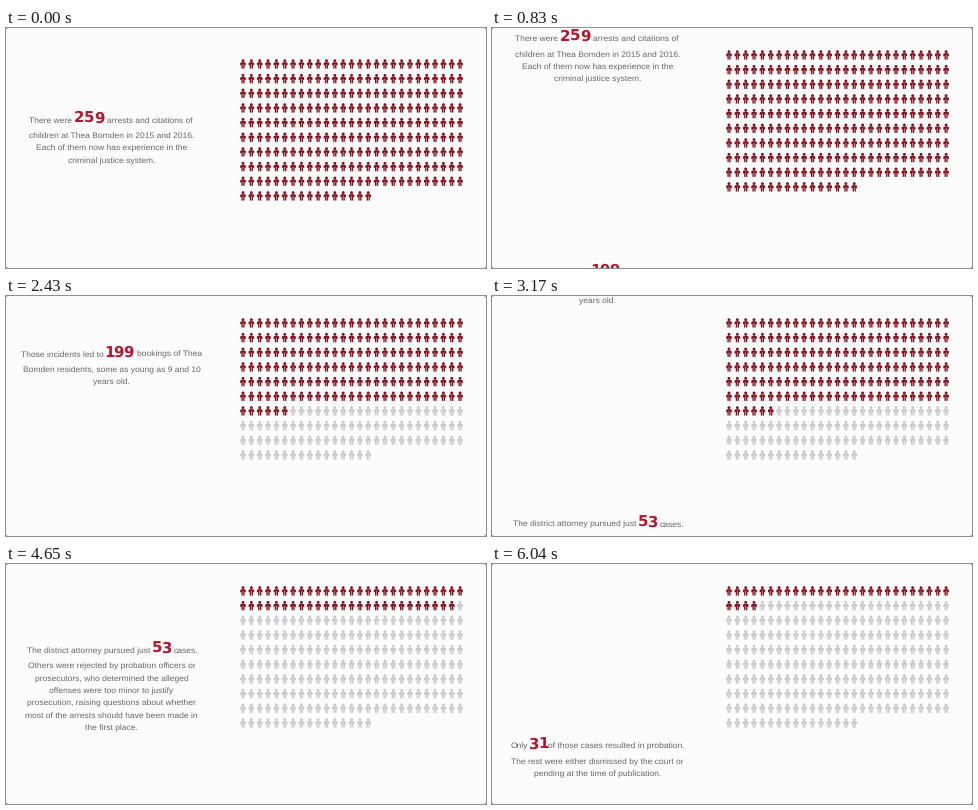
Animation of 480 by 240 pixels, one loop 6080 ms. Source, as a matplotlib script:

```python
import numpy as np
import matplotlib.pyplot as plt
from matplotlib.animation import FuncAnimation
from matplotlib.collections import PathCollection
from matplotlib.patches import FancyBboxPatch
from matplotlib.path import Path
from matplotlib.transforms import Affine2D, IdentityTransform

W, H, DPI = 480, 240, 100
FRAMES, STEP = 152, 40
PAPER, INK, RED = "#fdfcfd", "#666666", "#b5152b"
ICON_RED, ICON_GREY = "#83101f", "#c9c8ca"
COLS, PEOPLE = 27, 259
CENTER, TRIGGER = 105.5, 213

plt.rcParams["text.hinting"] = "no_hinting"

# Scroll distance in pixels at points in time (ms)
TIMES = [0, 610, 830, 1220, 1650, 1850, 2430, 3170, 4090, 4310, 4910, 5300, 5520, 6040]
SCROLL = [0, 61, 85, 133, 177, 191, 272, 350, 434, 462, 514, 550, 564, 667]

# top, red icons, lead, number, (left, right) of number, tail, further lines
BLOCKS = [
    (92, 259, "There were", "259", (68, 99), "arrests and citations of",
     ["children at Thea Bomden in 2015 and 2016.",
      "Each of them now has experience in the",
      "criminal justice system."]),
    (326, 168, "Those incidents led to", "199", (100, 129), "bookings of Thea",
     ["Bomden residents, some as young as 9 and 10",
      "years old."]),
    (577, 53, "The district attorney pursued just", "53", (146, 166), "cases.",
     ["Others were rejected by probation officers or",
      "prosecutors, who determined the alleged",
      "offenses were too minor to justify",
      "prosecution, raising questions about whether",
      "most of the arrests should have been made in",
      "the first place."]),
    (849, 31, "Only", "31", (38, 54), "of those cases resulted in probation.",
     ["The rest were either dismissed by the court or",
      "pending at the time of publication."]),
]

fig = plt.figure(figsize=(W / DPI, H / DPI), dpi=DPI, facecolor="#8a8a8c")
ax = fig.add_axes([0, 0, 1, 1])
ax.set(xlim=(0, W), ylim=(H, 0))
ax.axis("off")
ax.add_patch(FancyBboxPatch((0, 0), W, H, fc=PAPER, ec="none",
                            boxstyle="round,pad=0,rounding_size=2.5"))

labels = []


def label(x, y, text, ha, px=8.45, color=INK, font="Liberation Sans", weight="normal"):
    item = ax.text(x, y, text, ha=ha, va="baseline", fontsize=px * 72 / DPI,
                   color=color, family=font, weight=weight)
    labels.append((item, y))


def number(x, y, digits):
    for d in digits:
        narrow = d == "1"
        label(x - 1.4 * narrow - 0.6, y, d, "left", 15, RED, "DejaVu Sans", "bold")
        x += 7.6 if narrow else 10.4


for top, _, lead, num, (left, right), tail, lines in BLOCKS:
    base = top + 2.5
    label(left - 2, base, lead, "right")
    number(left, base, num)
    label(right + 2, base, tail, "left")
    for k, line in enumerate(lines):
        label(CENTER, base + 15.7 + 12.4 * k, line, "center")


def person():
    head = Path.unit_circle().transformed(Affine2D().scale(1.45).translate(0, 3.3))
    half = [(0.25, 0), (0.25, -4.6), (1.6, -4.6), (1.6, -0.9), (1.9, -0.9),
            (1.9, -1.3), (2.8, -1.3), (2.8, 0.9), (2.0, 1.7)]
    outline = half + [(-x, y) for x, y in reversed(half)]
    return Path.make_compound_path(head, Path(outline + outline[:1], closed=True))


index = np.arange(PEOPLE)
spots = np.column_stack([237 + 8.35 * (index % COLS), 36 + 14.66 * (index // COLS)])
crowd = PathCollection([person()], offsets=spots, offset_transform=ax.transData,
                       transform=IdentityTransform(), linewidths=0)
ax.add_collection(crowd, autolim=False)


def update(frame):
    scroll = np.interp(frame * STEP, TIMES, SCROLL)
    for item, y in labels:
        item.set_y(y - scroll)
        item.set_visible(-10 < y - scroll < H + 14)
    # The crowd scrolls a little, then sticks
    crowd.set_offsets(spots - [0, min(scroll, 9)])
    reds = [b[1] for b in BLOCKS if b[0] - scroll < TRIGGER][-1]
    crowd.set_facecolor([ICON_RED if i < reds else ICON_GREY for i in index])
    return []


anim = FuncAnimation(fig, update, frames=FRAMES, interval=STEP,
                     repeat=True, repeat_delay=0, blit=False)
plt.show()
```
